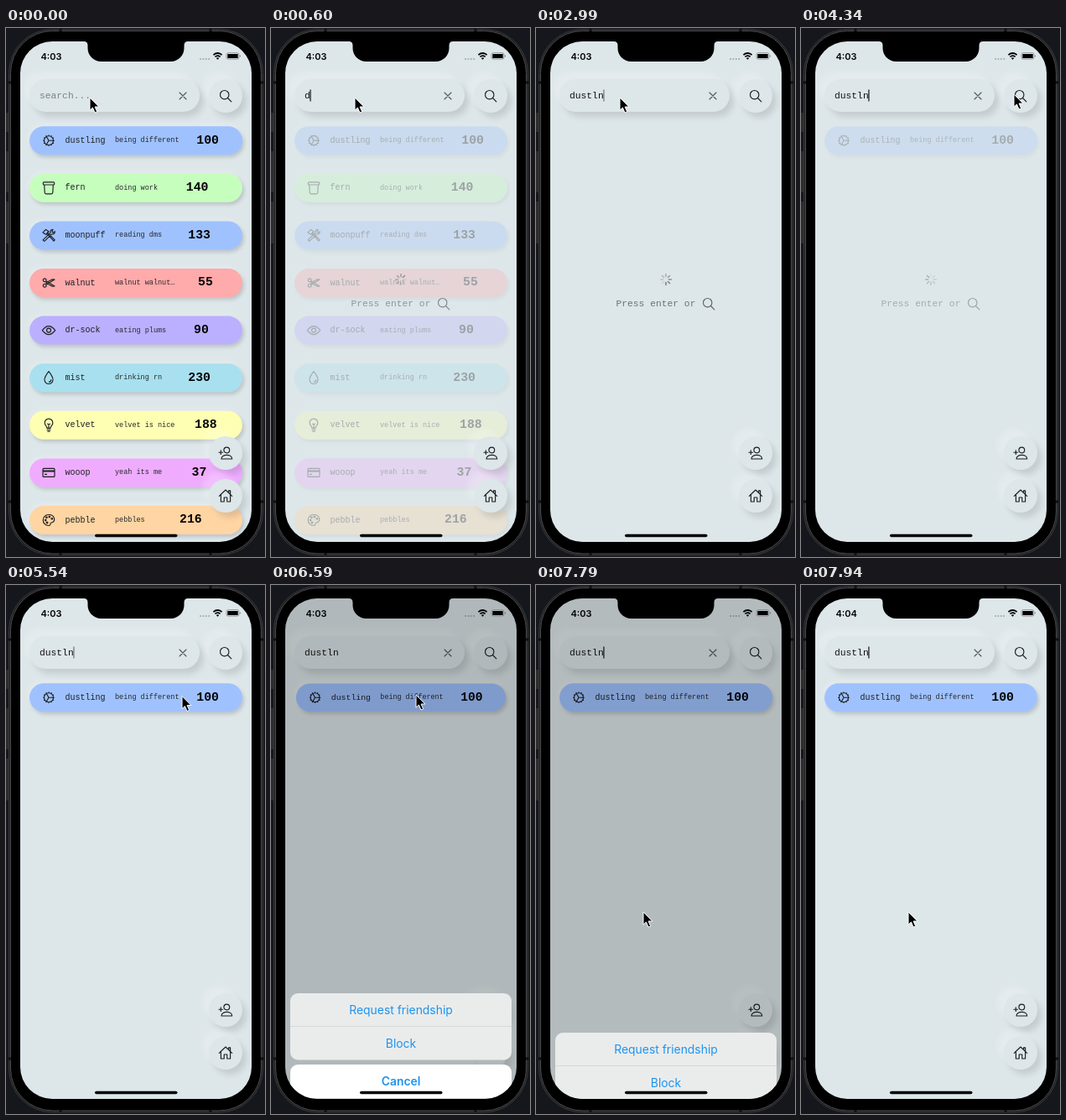
An HTML page for the animation above (8 s loop, 309 px wide and 631 px high).

```html
<!DOCTYPE html>
<html lang="en">
<head>
<meta charset="utf-8">
<title>Friend search</title>
<style>
html, body { margin: 0; width: 100%; height: 100%; overflow: hidden; background: #15171c; }
svg { display: block; width: 100%; height: 100%; }
.mono { font-family: "Liberation Mono", monospace; }
.ui { font-family: Inter, sans-serif; }
.mid { text-anchor: middle; }
.icon { fill: none; stroke: #1b1e20; stroke-width: 1.15; stroke-linecap: round; stroke-linejoin: round; }
.soft { fill: #dde6e9; filter: drop-shadow(5px 6px 3.5px rgba(0,0,0,.11)) drop-shadow(-8px -9px 3px rgba(255,255,255,.22)); }
.pill { filter: drop-shadow(2px 3px 2px rgba(0,0,0,.15)) drop-shadow(-2px -3px 3px rgba(255,255,255,.22)); }
</style>
</head>
<body>
<svg viewBox="0 0 309 631">
  <defs><clipPath id="clip"><rect x="17" y="16" width="276" height="597" rx="38"/></clipPath></defs>
  <path d="M0 101h4v23h-4zM0 147h4v49h-4zM0 207h4v50h-4z" fill="#2d2d2e"/>
  <rect x="3.5" y="1.5" width="303" height="627.5" rx="52" fill="#1d1d1f" stroke="#38383a"/>
  <rect x="5.5" y="3.5" width="299" height="623.5" rx="50" stroke="#4d4d50"/>
  <path d="M3 65h3M304 65h3M3 565h3M304 565h3M65 1v3M244 1v3M65 626v3M244 626v3" stroke="#111" stroke-width="3"/>
  <g clip-path="url(#clip)">
    <rect x="17" y="16" width="276" height="597" fill="#dde6e9"/>
    <g id="others"></g>
    <g id="first"></g>
    <g id="hint">
      <g id="spinner" transform="translate(155 300)" stroke="#33383a" stroke-width="1.4" stroke-linecap="round"></g>
      <text class="mono" x="95.5" y="332" font-size="11.3" fill="#33383a">Press enter or</text>
    </g>
    <rect class="soft" x="28" y="61" width="203" height="39" rx="19.5"/>
    <g id="buttons"></g>
    <path class="icon" d="M207 77l8 8m0-8l-8 8" style="stroke:#565b5e"/>
    <text id="query" class="mono" x="40" y="84" font-size="11.3"></text>
    <rect id="caret" y="73.5" width="1.1" height="14"/>
    <g fill="#a5acaf" id="dots"></g>
    <rect id="dim" x="17" y="16" width="276" height="597"/>
    <g id="sheet" class="ui mid" font-size="13.9" fill="#1e93ee">
      <rect x="23" y="464" width="264" height="79.5" rx="9" fill="#eaecec"/>
      <path d="M23 503.5h264" stroke="#cfd3d4" stroke-width=".8"/>
      <rect x="23" y="549" width="264" height="40.5" rx="9" fill="#fff"/>
      <text x="155" y="489">Request friendship</text>
      <text x="155" y="529">Block</text>
      <text x="155" y="574" font-weight="600">Cancel</text>
    </g>
    <path d="M93 16q4.5 0 4.5 5v3a16 16 0 0 0 16 16h83a16 16 0 0 0 16-16v-3q0-5 4.5-5z"/>
    <text id="clock" class="ui" x="41.5" y="37.7" font-size="11" font-weight="600"></text>
    <g fill="none" stroke="#000" stroke-width="1.7">
      <path d="M247.4 32.2q5.1-4.4 10.2 0M249.4 34.4q3.1-2.6 6.2 0"/>
      <path d="M252.5 37.8l-1.7-1.9q1.7-1.3 3.4 0z" fill="#000" stroke="none"/>
      <rect x="263" y="29.6" width="15" height="7.6" rx="2.2" stroke="#7f8688" stroke-width=".8"/>
      <path d="M264.3 30.9h12.4v5h-12.4zM279 32.2q1.2 1.2 0 2.4z" fill="#000" stroke="none"/>
    </g>
    <rect x="106" y="603.7" width="98.5" height="3.6" rx="1.8"/>
    <path id="cursor" d="M0 0v15.2l3.4-3.2 2.6 6 2.7-1.1-2.6-5.9h4.8z" stroke="#fff" stroke-width="1" stroke-linejoin="round"/>
  </g>
</svg>
<script>
const $ = id => document.getElementById(id);
const ring = (x, y, r) => `M${x - r} ${y}a${r} ${r} 0 1 0 ${2 * r} 0a${r} ${r} 0 1 0 ${-2 * r} 0`;
const spoke = (angle, a, b) => {
  const x = Math.cos(angle), y = Math.sin(angle);
  return `M${a * x} ${a * y}L${b * x} ${b * y}`;
};
const turn = (n, a, b) => Array.from({ length: n }, (_, i) => spoke(i * 2 * Math.PI / n, a, b)).join("");

const icons = {
  gear: ring(0, 0, 5.5) + turn(12, 5.5, 6.4) + turn(3, 0, 5.5),
  cup: "M-5.8-7h11.6q.9 0 .9 1v1.2q0 1-.9 1H-5.8q-.9 0-.9-1V-6q0-1 .9-1zM-5.3-3.8L-4.8 5.5q.1 1.5 1.6 1.5H3.2q1.5 0 1.6-1.5L5.3-3.8",
  tools: "M-7-3.5L-3.5-7 0-4.7-3-1zM-2.5-2.5L6 6.8 7.2 5.5-1.5-3.5M-7 5.5L2-3Q1-6.5 5-7L3.8-4.5 5.3-3.2 7.3-4.8Q7.5-.8 3.5-1.5L-5.2 7z",
  scissors: ring(-4.8, -3.2, 1.9) + ring(-4.8, 3.2, 1.9) + "M-3.2-2.2L7 4 4.5 4.2-3.2.2M-3.2 2.2L7-4 4.5-4.2-3.2-.2",
  eye: "M-7.7 0Q0-10 7.7 0 0 10-7.7 0z" + ring(0, 0, 2.5),
  drop: "M0-7.5Q5-1.2 5 2.3A5 5 0 0 1-5 2.3Q-5-1.2 0-7.5zM2.8 2.5Q2.6 4.8.4 4.9",
  bulb: "M-2.1 3.6Q-2 2-3.4.5A4.8 4.8 0 1 1 3.4.5Q2 2 2.1 3.6zM-2 5.5h4M-1.2 7.4h2.4M0 3.4V-1M-1.5-1.6L0-1 1.5-1.6",
  card: "M-6-5H6Q7-5 7-4V4Q7 5 6 5H-6Q-7 5-7 4V-4Q-7-5-6-5zM-7-2.3H7M-7-1.5H7M-4.5 2h2",
  palette: "M0-6.5C-9-6.5-9 6.5 0 6.5 3.4 6.5.8 3.6 3 3 9 2.6 7.5-6.5 0-6.5z" +
    ring(-3.8, 0, .8) + ring(-2.6, -3.2, .8) + ring(.8, -4, .8) + ring(3.8, -1.6, .8) + ring(-2, 3, .9),
  lens: ring(-1.3, -1.3, 5.2) + "M2.5 2.5L6.8 6.8",
  person: ring(1.3, -3.5, 3.4) + "M-5 7C-5 .8 7.7.8 7.7 7zM-8-.8h4.6M-5.7-3.1v4.6",
  house: "M-7.7.3L0-7 7.7.3M-5.6-1.6V7h3.8V2h3.6v5h3.8V-1.6M3.6-3.8V-6.2h2v4.2"
};
const icon = (name, x, y) => `<path class="icon" d="${icons[name]}" transform="translate(${x} ${y})"/>`;

// icon, name, status, score, score x, colour
const friends = [
  ["gear", "dustling", "being different", 100, 227.3, "#9fc2ff"],
  ["cup", "fern", "doing work", 140, 214.8, "#c6ffbd"],
  ["tools", "moonpuff", "reading dms", 133, 217.3, "#9fc2ff"],
  ["scissors", "walnut", "walnut walnut…", 55, 229, "#ffaaab"],
  ["eye", "dr-sock", "eating plums", 90, 224, "#bbb0ff"],
  ["drop", "mist", "drinking rn", 230, 217.3, "#a9e0ef"],
  ["bulb", "velvet", "velvet is nice", 188, 225, "#feffb2"],
  ["card", "wooop", "yeah its me", 37, 221.5, "#efacff"],
  ["palette", "pebble", "pebbles", 216, 207, "#ffd5a3"]
];
const rows = friends.map(([pic, name, status, score, x, color], i) => {
  const y = 134.2 + 56.6 * i;
  return `<rect class="pill" x="28" y="${y - 17}" width="254" height="34" rx="17" fill="${color}"/>` +
    icon(pic, 51, y) + `<g class="mono">
    <text x="70.5" y="${y + 2.5}" font-size="10" fill="#1c1f22">${name}</text>
    <text x="130" y="${y + 2}" font-size="8.5" fill="#26292c">${status}</text>
    <text x="${x}" y="${y + 3.4}" font-size="14.8" font-weight="700">${score}</text></g>`;
});
$("first").innerHTML = rows[0];
$("others").innerHTML = rows.slice(1).join("");
$("hint").innerHTML += icon("lens", 206, 329);
$("buttons").innerHTML = [["lens", 81], ["person", 507], ["house", 558]]
  .map(([name, y]) => `<circle class="soft" cx="262" cy="${y}" r="20"/>` + icon(name, 262, y)).join("");
$("dots").innerHTML = [232, 235.4, 238.8, 242.2].map(x => `<circle cx="${x}" cy="37" r="1.1"/>`).join("");
$("spinner").innerHTML = Array.from({ length: 8 }, (_, i) =>
  `<path d="${spoke((i - 2) * Math.PI / 4, 3.4, 6.4)}"/>`).join("");
const blades = [...$("spinner").children];

const clamp = v => Math.max(0, Math.min(1, v));
// linear interpolation through [time, value] pairs
function track(t, keys) {
  const i = keys.findIndex(k => k[0] > t);
  if (i < 0) return keys[keys.length - 1][1];
  if (!i) return keys[0][1];
  const [a, u] = keys[i - 1], [b, v] = keys[i];
  return u + (v - u) * (t - a) / (b - a);
}

const word = "dustln", strokes = [150, 750, 1050, 1350, 1790, 2090];
const path = [
  [3290, 100, 83], [3590, 140, 65.5], [3890, 225, 72], [4190, 254, 78], [4490, 254, 80], [4640, 253, 92],
  [5240, 221, 123], [5540, 210, 132.5], [5840, 210, 132.5], [6290, 173, 131], [6590, 173, 131], [6890, 128, 390]
];
const pathX = path.map(p => [p[0], p[1]]), pathY = path.map(p => [p[0], p[2]]);
const fade = [[300, 1], [450, .65], [600, .29], [750, .08], [900, 0]];
const opacity = (id, v) => $(id).setAttribute("opacity", v);

function draw(t) {
  const list = track(t, fade);
  const result = track(t, [[4190, 0], [4790, 1]]);
  opacity("others", list);
  opacity("first", Math.max(list, result));
  opacity("hint", .66 * (1 - list) * (1 - track(t, [[4190, 0], [4490, 1]])));
  const press = track(t, [[6440, 1], [6590, .985], [6740, 1]]);
  $("first").setAttribute("transform", `translate(155 134) scale(${press}) translate(-155 -134)`);

  const head = Math.floor(t / 125) + 5;
  blades.forEach((b, i) => b.setAttribute("opacity", 1 - ((head - i) % 8 + 8) % 8 * .115));

  const n = strokes.filter(s => s <= t).length;
  $("query").textContent = n ? word.slice(0, n) : "search...";
  $("query").setAttribute("fill", n ? "#111" : "#7b8184");
  const blink = clamp(.9 + 2.2 * Math.cos((t - 265) * Math.PI / 500));
  $("caret").setAttribute("x", 39.7 + n * 6.78);
  opacity("caret", !n ? 0 : t < 2240 || t >= 7490 ? 1 : t >= 6590 ? 0 : blink);

  const open = t >= 6590 && t < 7940;
  const drop = track(t, [[6590, 23], [6740, 4], [6890, 0], [7490, 0], [7640, 14], [7790, 70]]);
  $("sheet").setAttribute("transform", `translate(0 ${drop})`);
  opacity("sheet", +open);
  opacity("dim", open ? track(t, [[7640, .2], [7790, .19]]) : 0);
  $("clock").textContent = t < 7940 ? "4:03" : "4:04";
  $("cursor").setAttribute("transform", `translate(${track(t, pathX)} ${track(t, pathY)})`);
}

// each picture holds for 150 ms, with one short step before 1490
const start = performance.now();
function frame() {
  const t = (performance.now() - start) % 8000, base = t < 1490 ? 0 : 1490;
  draw(base + Math.floor((t - base) / 150) * 150);
  requestAnimationFrame(frame);
}
frame();
</script>
</body>
</html>
```
